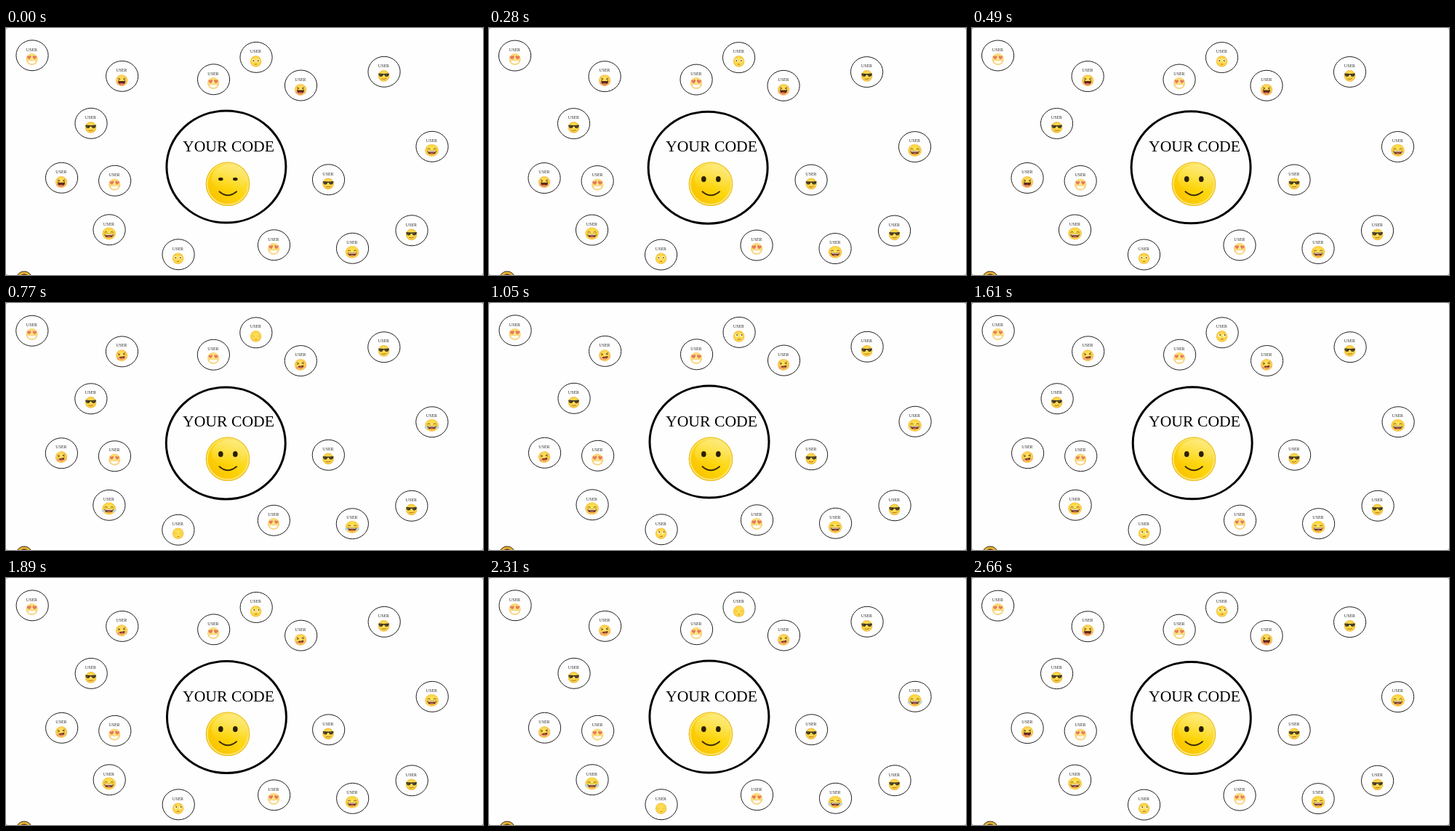
Animation, 656 px wide and 340 px high, one loop 2.73 s. Source, as an HTML page with a canvas:

```html
<!DOCTYPE html>
<html>
<head>
<meta charset="utf-8">
<style>
  html, body { margin: 0; width: 100%; height: 100%; overflow: hidden; background: #c4c4c4; }
  canvas { display: block; background: #fefefe; border-radius: 4px; }
</style>
</head>
<body>
<canvas id="stage" width="656" height="340"></canvas>
<script>
const ctx = document.getElementById('stage').getContext('2d');
const STEP = 70, STEPS = 39, TAU = Math.PI * 2;
const DARK = '#5a3414';

// x, y of each ring and the face inside it
const users = [
  [36, 38, hearts], [159.6, 66.6, laugh], [285.5, 71, hearts], [344, 40.6, flushed],
  [405.5, 79.3, laugh], [520, 60.5, shades], [117, 131.5, shades], [586, 163.5, joy],
  [76.5, 206.5, laugh], [149.6, 210.5, hearts], [443.5, 209, shades], [142, 278, joy],
  [237, 312, flushed], [368.5, 299, hearts], [476.5, 303.5, joy], [558, 279, shades]
];

// step, offset in turns: irregularities of the three-step orbit
const drift = [[0, 0], [4, -.017], [11, .12], [19, -.098], [27, .086], [33, 0], [38, .253]];

function orbitAngle(n) {
  const i = Math.max(1, drift.findIndex(d => d[0] >= n));
  const [a, va] = drift[i - 1], [b, vb] = drift[i];
  const offset = va + (vb - va) * (n - a) / (b - a);
  return TAU * (-.186 - n / 3 + offset);
}

function oval(x, y, rx, ry, fill, angle = 0) {
  ctx.beginPath();
  ctx.ellipse(x, y, rx, ry, angle, 0, TAU);
  ctx.fillStyle = fill;
  ctx.fill();
}

function ring(x, y, rx, ry, width, color = '#000') {
  ctx.beginPath();
  ctx.ellipse(x, y, rx, ry, 0, 0, TAU);
  ctx.lineWidth = width;
  ctx.strokeStyle = color;
  ctx.stroke();
}

function path(d, fill, stroke, width = 1) {
  const p = new Path2D(d);
  if (fill) { ctx.fillStyle = fill; ctx.fill(p); }
  if (stroke) { ctx.strokeStyle = stroke; ctx.lineWidth = width; ctx.stroke(p); }
}

function at(x, y, draw, scale = 1, angle = 0) {
  ctx.save();
  ctx.translate(x, y);
  ctx.rotate(angle);
  ctx.scale(scale, scale);
  draw();
  ctx.restore();
}

function ball(rx, ry, light, mid, edge) {
  const g = ctx.createRadialGradient(0, -ry * .2, ry * .1, 0, 0, rx);
  g.addColorStop(0, light);
  g.addColorStop(.75, mid);
  g.addColorStop(1, edge);
  oval(0, 0, rx, ry, g);
}

function hearts(n) {
  ball(8.1, 8.1, '#fde488', '#fbdc72', '#f6cf7c');
  const beat = 1 + .07 * Math.sin(TAU * n / 13);
  for (const x of [-3.7, 3.7])
    at(x, -2.4, () => path('M0 2.6C-4.8 -.5 -2.4 -3.8 0 -1.5C2.4 -3.8 4.8 -.5 0 2.6Z', '#e8785a'), beat, x * .04);
  path('M-6 1.4Q0 2.6 6 1.4Q5.2 6.6 0 6.6Q-5.2 6.6 -6 1.4Z', '#fffcf0', '#f3c67c', .6);
}

function laugh(n) {
  const tilted = n >= 8 && n < 36;
  at(0, .6, () => {
    ball(8.2, 8, '#fde262', '#fbd24c', '#f3bd62');
    oval(-5, 3.6, 2, 2, '#f3a267');
    oval(5, 3.6, 2, 2, '#f5bd62');
    path('M-5 -3.3L-2 -1.8L-5 -.7M5 -3.3L2 -1.8L5 -.7', null, DARK, .8);
    if (tilted) {
      path('M-3.6 1.4Q0 2 4 1Q4 5 .3 5.2Q-3.2 5 -3.6 1.4Z', '#7a3a22');
      oval(-.2, 4.6, 2.5, 1.2, '#ee8a6c');
    } else {
      path('M-5 .2Q0 1.2 5 .2Q5 5.6 0 5.8Q-5 5.6 -5 .2Z', '#5f2a1a');
      oval(-.4, 5.2, 3.2, 1.5, '#ee8068');
    }
  }, 1, tilted ? -.12 : 0);
}

function joy(n) {
  ball(9.3, 8.4, '#fde45c', '#fcd440', '#f0bc4c');
  path('M-6 -1.5Q-4 -3.6 -2 -1.5M2 -1.5Q4 -3.6 6 -1.5', null, DARK, .8);
  path('M-6.4 .8H6.4Q5.6 5.6 0 5.8Q-5.6 5.6 -6.4 .8Z', '#66301a');
  path('M-5.6 1H5.6L5 2.2H-5Z', '#f4e6d0');
  oval(0, 4.9, 3, 1.1, '#e58468');
  const tears = Math.max(0, Math.cos(TAU * (n - 11) / 22));
  if (tears > .2)
    for (const side of [-1, 1])
      oval(side * 7.8, 3, 2.5 * tears, 1.7 * tears, '#b5d8d4', -side * .65);
}

function shades() {
  at(0, .4, () => {
    ball(7.8, 7.8, '#fde25a', '#fad042', '#eeb94a');
    path('M-7.4 -3.4Q0 -2.6 7.4 -3.4L6.8 -.8Q5.8 1.4 3.4 1.2Q1.4 .9 .9 -1.4H-.9Q-1.4 .9 -3.4 1.2Q-5.8 1.4 -6.8 -.8Z', '#3e3420');
    path('M-5.4 -2L-3.8 -.2M2.6 -2L4.2 -.2', null, '#8d8058', .8);
    path('M-3 4Q.6 5.2 3.2 3.4', null, '#a06a20', .9);
  });
}

function flushed(n) {
  at(0, .3, () => {
    ball(7.8, 7.8, '#fde258', '#fcd448', '#f4c24e');
    const closed = (n >= 9 && n < 15) || (n >= 31 && n < 36);
    const rolling = n >= 15;
    if (closed) {
      path('M-5.2 -.5Q-3.4 .5 -1.6 -.5M1.6 -.5Q3.4 .5 5.2 -.5', null, '#e0b23c', .7);
      path('M-1 4.2H1.6', null, '#b07a28', .8);
      return;
    }
    for (const x of [-3.2, 3.2]) {
      oval(x, -1.2, 2, 2.1, '#fdf3c4');
      oval(x + (rolling ? .8 : 0), rolling ? -2 : -1, .9, 1, '#5c3d16');
    }
    path('M-5 -4.8Q-3.6 -5.5 -2 -4.8M2 -4.8Q3.6 -5.5 5 -4.8', null, '#d5a03c', .5);
    path(rolling ? 'M-1.8 4.3Q.4 3.4 2.2 4' : 'M-1.5 4H1.5', null, '#9a6220', .9);
  });
}

function smile(n) {
  const body = ctx.createLinearGradient(-20, 20, 18, -20);
  body.addColorStop(0, '#fac400');
  body.addColorStop(.5, '#fdd60a');
  body.addColorStop(1, '#fbe04a');
  oval(0, 0, 30.3, 30.3, body);
  const gloss = ctx.createLinearGradient(0, -27, 0, 8);
  gloss.addColorStop(0, '#fff2a099');
  gloss.addColorStop(1, '#fff2a000');
  oval(2, -8, 24, 19, gloss);
  ring(0, 0, 29.7, 29.7, 1.2, '#ecc02a');
  ring(0, 0, 28.2, 28.2, 1.6, '#fbe679');
  const open = Math.min(1, .15 + Math.abs(n - 1) * .4);
  for (const x of [-9.7, 10.3]) oval(x, -6.7, 3.3, 4.1 * open, '#2b1f08');
  ctx.lineCap = 'round';
  path('M-11.5 10.5Q0 20.5 12 10.5', null, '#3d2c08', 2);
}

function label(text, x, y, size, color) {
  ctx.font = `${size}px "Liberation Serif", "Times New Roman", serif`;
  ctx.textAlign = 'center';
  ctx.fillStyle = color;
  ctx.fillText(text, x, y);
}

function draw(n) {
  ctx.clearRect(0, 0, 656, 340);
  const angle = orbitAngle(n), dx = Math.cos(angle) * 1.3, dy = Math.sin(angle);
  for (const [x, y, face] of users) {
    ring(x - .1 + dx * .27, y + dy * .27, 22.1, 21, 1, '#1c1c1c');
    label('USER', x - .6, y - 6.5, 5.9, '#2a2a2a');
    at(x - .4, y + 5, () => face(n));
  }
  ring(302.4 + dx, 192 + dy, 82, 77, 3);
  label('YOUR CODE', 306, 170.3, 21.7, '#000');
  at(305, 214.7, () => smile(n));

  oval(25, 346, 11, 11, '#e8b53c');
  ring(25, 346, 11, 11, 1, '#3a2a10');
  path('M20.5 340Q25 336.5 29.5 340Z', '#6a4a1a');
}

function tick() {
  draw(Math.floor(performance.now() / STEP) % STEPS);
  requestAnimationFrame(tick);
}
tick();
</script>
</body>
</html>
```
